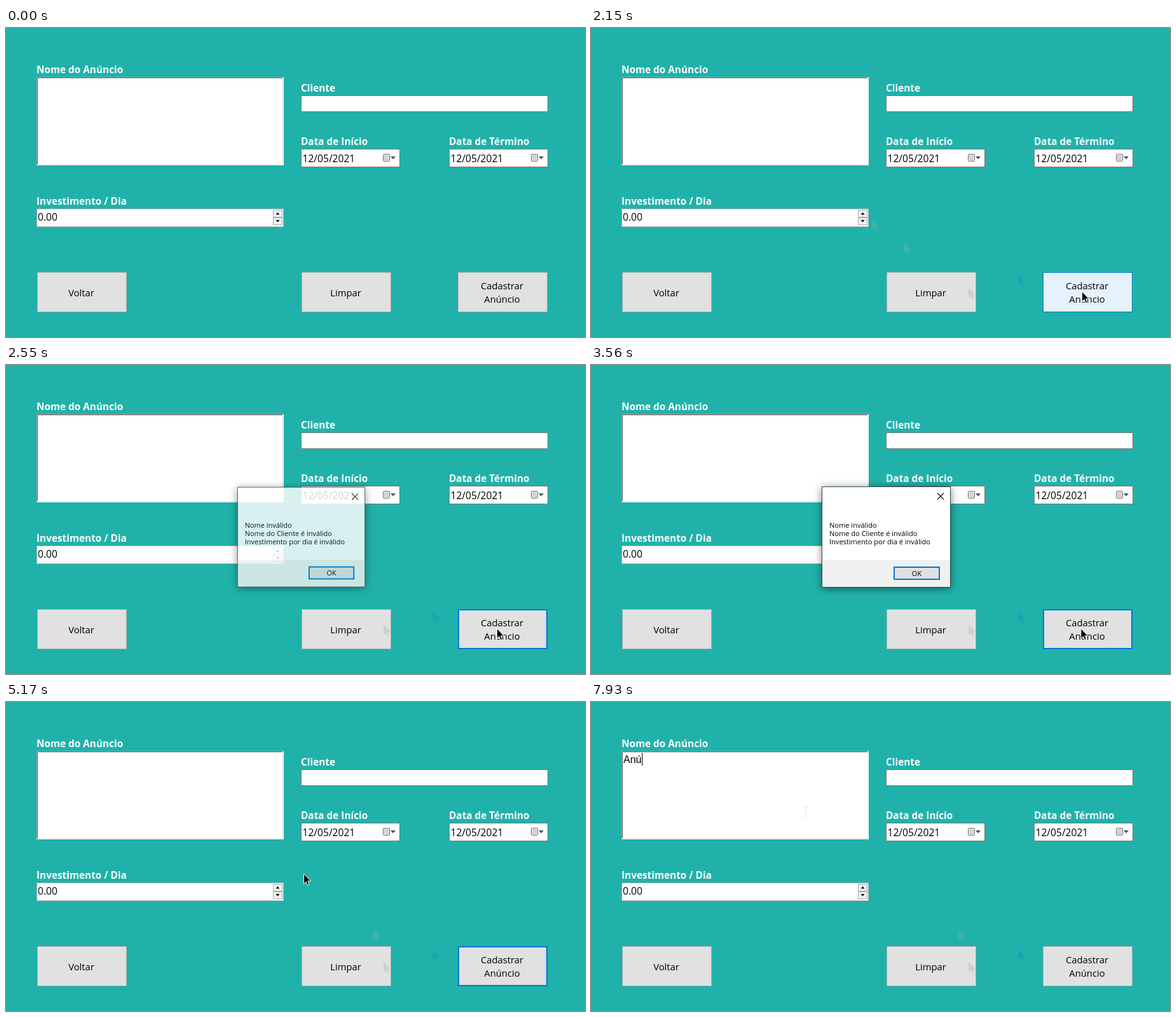
An HTML page for the animation above (8000 ms loop, 911 by 486 pixels).

```html
<!DOCTYPE html>
<html lang="pt">
<head>
<meta charset="utf-8">
<title>Cadastro de anúncio</title>
<style>
html, body { margin: 0; width: 100%; height: 100%; overflow: hidden; background: #20b2aa; }
svg { display: block; width: 911px; height: 486px; font-family: "Open Sans", "Noto Sans", sans-serif; }
.label { font-size: 15.35px; font-weight: 700; fill: #fff; }
.value { font-size: 15.6px; }
.button { font-size: 14.8px; text-anchor: middle; }
.small { font-size: 11.05px; }
.typed { font: 16px "Liberation Sans", Arial, sans-serif; }
</style>
</head>
<body>
<svg id="stage" viewBox="0 0 911 486">
  <defs>
    <filter id="shadow" x="-20%" y="-20%" width="140%" height="140%">
      <feDropShadow dx="0" dy="2" stdDeviation="6.5" flood-color="#000" flood-opacity=".5"/>
    </filter>
    <path id="arrow" d="M.5 .5V16.5L4 13L6.5 18.5L9 17.5L6.6 12H11.5Z"/>
    <path id="beam" d="M-3.5 -7.5H-1L0 -6.5L1 -7.5H3.5M0 -6.5V6.5M-3.5 7.5H-1L0 6.5L1 7.5H3.5" fill="none"/>
  </defs>
  <rect width="911" height="486" fill="#20b2aa"/>
  <g id="form"></g>
  <text id="typed" class="typed" x="51" y="96"></text>
  <rect id="caret" y="80" width="1" height="20"/>
  <g id="trail"></g>
  <g id="dialog"></g>
  <use id="pointer" href="#arrow" stroke="#fff"/>
  <use id="ibeam" href="#beam" stroke="#000"/>
</svg>
<script>
const LOOP = 8000, STEP = 66.7;
const $ = id => document.getElementById(id);
const set = (el, attrs) => { for (const k in attrs) el.setAttribute(k, attrs[k]); };
const show = (el, on) => el.setAttribute("visibility", on ? "visible" : "hidden");
const between = (t, a, b) => t >= a && t < b;
const ramp = (t, a, b) => Math.min(1, Math.max(0, (t - a) / (b - a)));
const smooth = p => p * p * (3 - 2 * p);
const easeOut = p => 1 - (1 - p) ** 2;
const stepped = t => Math.floor(t / STEP) * STEP;

function add(parent, tag, attrs, content) {
  const el = document.createElementNS("http://www.w3.org/2000/svg", tag);
  set(el, attrs);
  if (content) el.textContent = content;
  parent.appendChild(el);
  return el;
}

// A rectangle whose border lies inside its outer bounds.
const bounds = (x, y, w, h, line) =>
  ({ x: x + line / 2, y: y + line / 2, width: w - line, height: h - line, "stroke-width": line });
const box = (parent, x, y, w, h, fill, stroke) =>
  add(parent, "rect", { ...bounds(x, y, w, h, 1), fill, stroke });
const text = (parent, cls, x, y, content) => add(parent, "text", { class: cls, x, y }, content);
const path = (parent, d, attrs) => add(parent, "path", { d, ...attrs });

const form = $("form"), dialog = $("dialog");

function dateField(x, label) {
  text(form, "label", x, 184, label);
  box(form, x, 190, 156, 29, "#fff", "#7a7a7a");
  text(form, "value", x + 2.5, 211, "12/05/2021");
  add(form, "rect", { x: x + 129.5, y: 198.5, width: 10, height: 11, rx: 1, fill: "#e6e6e6", stroke: "#6e6e6e" });
  path(form, `M${x + 131} 201.5h7m-7 2.5h7m-7 2.5h7`, { stroke: "#999", "stroke-dasharray": "1.5 1" });
  path(form, `M${x + 141} 202h8l-4 4.5z`, { fill: "#43557a" });
}

function button(x, lines) {
  const rect = box(form, x, 384, 141, 63, "#e1e1e1", "#adadad");
  const top = lines.length > 1 ? 411 : 422;
  lines.forEach((line, i) => text(form, "button", x + 69.5, top + i * 21, line));
  return rect;
}

text(form, "label", 48, 71, "Nome do Anúncio");
add(form, "rect", { x: 48, y: 77, width: 389, height: 139, fill: "#fff" });
path(form, "M48.5 215V77.5H436", { fill: "none", stroke: "#a0a0a0" });
path(form, "M49.5 214V78.5H435", { fill: "none", stroke: "#696969" });
path(form, "M49 214.5H435.5V78", { fill: "none", stroke: "#e3e3e3" });

text(form, "label", 464, 100, "Cliente");
box(form, 464, 106, 389, 26, "#fff", "#7a7a7a");
dateField(464, "Data de Início");
dateField(697, "Data de Término");

text(form, "label", 48, 278, "Investimento / Dia");
box(form, 48, 284, 389, 29, "#fff", "#abadb3");
text(form, "value", 50, 303, "0.00");
for (const y of [286, 298]) box(form, 420, y, 15, 12, "#f0f0f0", "#adadad");
path(form, "M424.5 293.5h6l-3 -3.5zM424.5 302h6l-3 3.5z");

button(49, ["Voltar"]);
button(465, ["Limpar"]);
const submit = button(711, ["Cadastrar", "Anúncio"]);

box(dialog, 363, 191, 203, 159, "#fff", "#2f4f4d").setAttribute("filter", "url(#shadow)");
add(dialog, "rect", { x: 364, y: 307, width: 201, height: 42, fill: "#f0f0f0" });
path(dialog, "M545 201.5l10 10m0 -10l-10 10", { stroke: "#111", "stroke-width": 1.1 });
["Nome inválido", "Nome do Cliente é inválido", "Investimento por dia é inválido"]
  .forEach((line, i) => text(dialog, "small", 375, 256 + i * 13, line));
const ok = box(dialog, 476, 317, 73, 21, "#e1e1e1", "#0078d7");
text(dialog, "small", 512.5, 332, "OK").setAttribute("text-anchor", "middle");

// Pointer strokes; bend curves a stroke by easing y ahead of or behind x.
const entry = { x: 640, y: 441 };
const strokes = [
  { from: 740, to: 1200, x: 392, y: 266 },
  { from: 1200, to: 1410, x: 790, y: 440 },
  { from: 1500, to: 1700, x: 811, y: 446 },
  { from: 1700, to: 2130, x: 772, y: 414 },
  { from: 3500, to: 4270, x: 502.5, y: 325, bend: 1.38 },
  { from: 4980, to: 5510, x: 337.5, y: 172, bend: .65 },
];

function pointerAt(t) {
  return strokes.reduce((at, { from, to, x, y, bend = 1 }) => {
    const p = smooth(ramp(t, from, to));
    return { x: at.x + (x - at.x) * p, y: at.y + (y - at.y) * p ** bend };
  }, entry);
}

// Faint marks left where the pointer passed; the dialog wipes those it covers.
function mark(time, fill = "#8fb5ae") {
  const { x, y } = pointerAt(stepped(time));
  const covered = x < 575 && y < 366;
  const to = !covered || time > 4770 ? LOOP : time < 2490 ? 2490 : 4770;
  const el = add($("trail"), "use", { href: "#arrow", x, y, fill, opacity: .32 });
  return { from: time + STEP, to, el };
}
const trail = [mark(870), mark(1005), mark(1070), mark(1345, "#2080c8"), mark(4035)];

function buttonLook(pressed, hover, idleStroke) {
  return {
    fill: pressed ? "#cce4f7" : hover ? "#e5f1fb" : "#e1e1e1",
    stroke: pressed ? "#005499" : hover ? "#0078d7" : idleStroke,
  };
}

function paintSubmit(t) {
  const focused = between(t, 2430, 5790);
  set(submit, {
    ...bounds(711, 384, 141, 63, focused ? 2 : 1),
    ...buttonLook(between(t, 2300, 2430), between(t, 1410, 2300), focused ? "#0078d7" : "#adadad"),
  });
}

function paintDialog(t) {
  const now = stepped(t);
  const opacity = easeOut(ramp(now, 2330, 2680)) - easeOut(ramp(now, 4530, 4735));
  const scale = .95 + .05 * opacity;
  show(dialog, opacity > 0);
  set(dialog, { opacity, transform: `translate(464.5 270.5) scale(${scale}) translate(-464.5 -270.5)` });
  const hover = t >= 4230;
  set(ok, {
    ...bounds(476, 317, 73, 21, hover ? 1 : 2),
    ...buttonLook(between(t, 4500, 4570), hover, "#0078d7"),
  });
}

function paintTyping(t) {
  const keyTimes = [6800, 7400, 7930].filter(time => time <= t);
  const count = keyTimes.length;
  const sinceKey = t - (keyTimes.pop() ?? 5790);
  $("typed").textContent = "Anú".slice(0, count);
  $("caret").setAttribute("x", count ? 53 + count * 9 : 51);
  show($("caret"), between(sinceKey, 0, 530));
}

function paintPointer(t) {
  const at = pointerAt(stepped(t));
  const overText = at.x < 436 && at.y < 215;
  set($("pointer"), at);
  set($("ibeam"), { ...at, opacity: t < 6800 ? 1 : .1 });
  show($("pointer"), t >= 740 && !overText);
  show($("ibeam"), overText);
}

function render(t) {
  paintSubmit(t);
  paintDialog(t);
  paintTyping(t);
  paintPointer(t);
  for (const { from, to, el } of trail) show(el, between(t, from, to));
}

let start;
function tick(now) {
  start ??= now;
  render((now - start) % LOOP);
  requestAnimationFrame(tick);
}
render(0);
requestAnimationFrame(tick);
</script>
</body>
</html>
```
